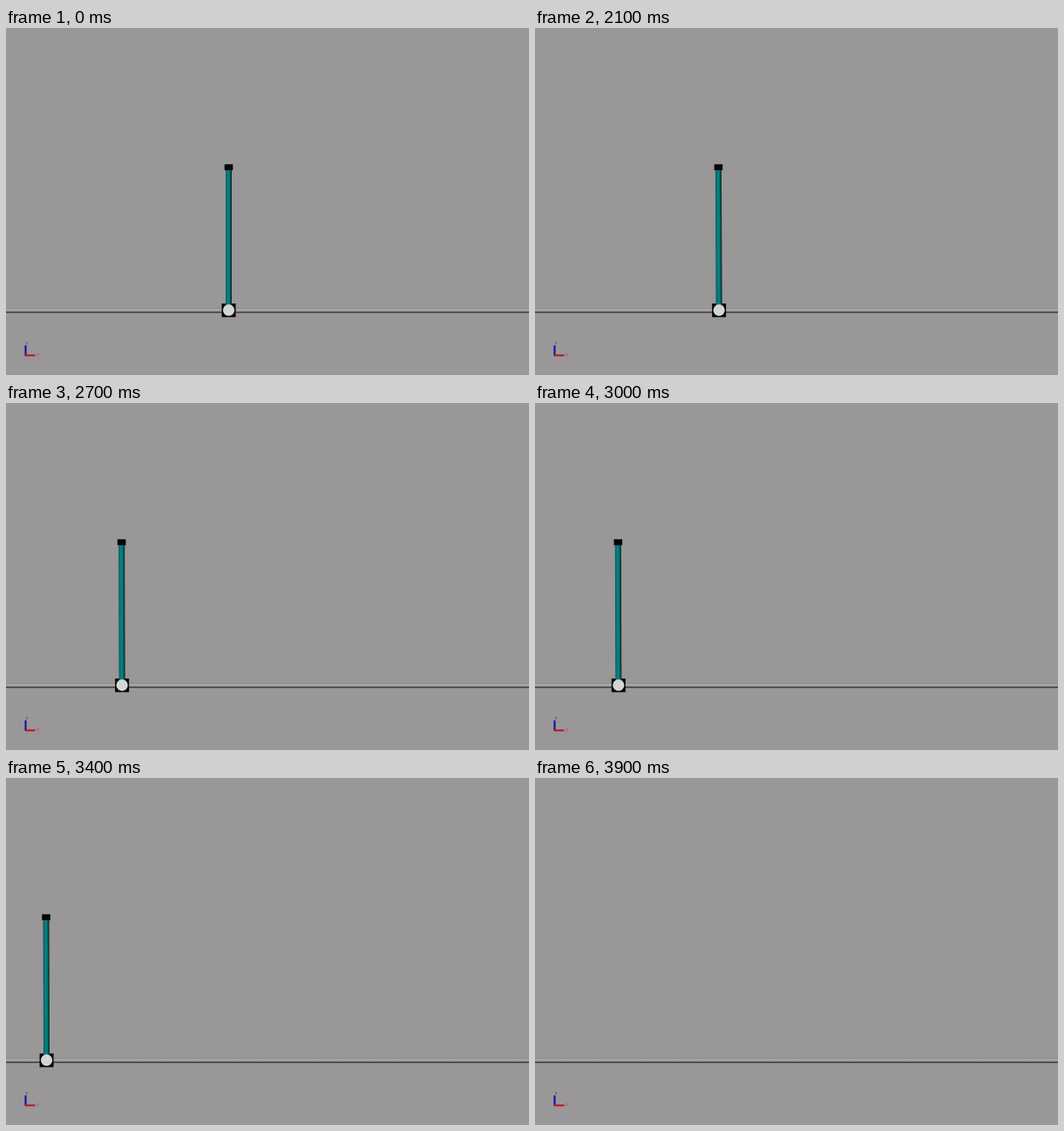
Write an HTML page that moves like this. It is 600 px wide and 398 px high and loops after 5000 ms.

```html
<!DOCTYPE html>
<html lang="en">
<head>
<meta charset="utf-8">
<title>Cart and pole</title>
<style>
  html, body { margin: 0; width: 100%; height: 100%; overflow: hidden; background: #999798; }
  svg { display: block; width: 100vw; height: 100vh; }
  text { font-family: "Liberation Sans", Arial, sans-serif; font-size: 6px; }
</style>
</head>
<body>
<svg viewBox="0 0 600 398">
  <defs>
    <linearGradient id="rail" x1="0" y1="0" x2="0" y2="1">
      <stop offset="0" stop-color="#848283"/>
      <stop offset=".2" stop-color="#9c9a9b"/>
      <stop offset=".42" stop-color="#b0aeaf"/>
      <stop offset=".62" stop-color="#8a8889"/>
      <stop offset=".85" stop-color="#4c4a4b"/>
      <stop offset="1" stop-color="#413f40"/>
    </linearGradient>
    <linearGradient id="teal" x1="0" y1="0" x2="1" y2="0">
      <stop offset="0" stop-color="#084e4e"/>
      <stop offset=".2" stop-color="#067575"/>
      <stop offset=".45" stop-color="#058484"/>
      <stop offset=".68" stop-color="#067070"/>
      <stop offset=".86" stop-color="#0a3c3c"/>
      <stop offset="1" stop-color="#082626"/>
    </linearGradient>
  </defs>
  <rect width="600" height="398" fill="#999798"/>
  <rect y="321" width="600" height="6" fill="url(#rail)"/>

  <path d="M22.5 364V376" stroke="#0a0aa8" stroke-width="2"/>
  <path d="M22 375.5H33.5" stroke="#b81414" stroke-width="2"/>
  <text x="22.5" y="363" fill="#4646a0">z</text>
  <text x="35" y="375.5" fill="#b84a4a">x</text>

  <g id="cart">
    <rect x="-8" y="316" width="16" height="15.6" fill="#050505"/>
    <g id="pole">
      <rect x="-3.5" y="162" width="7" height="157" fill="url(#teal)"/>
    </g>
    <rect id="cap" x="-4.8" y="156.3" width="9.6" height="6.8" fill="#050505"/>
    <circle cy="323.7" r="6.6" fill="#d3d4d4"/>
  </g>
</svg>
<script>
  const LOOP = 5000, START = 1800, END = 3900, STEP = 100;
  const PIVOT = 323.7, CAP_Y = 159.7;
  const [cart, pole, cap] = ["cart", "pole", "cap"].map(id => document.getElementById(id));

  // The cart is kicked left, then its speed settles; the pole lean damps out.
  function pose(t) {
    if (t < START) return { x: 255.5, lean: 0 };
    const n = Math.floor((t - START) / STEP);
    return {
      x: 254.5 - 12.2 * n - 13 * (1 - Math.exp(-n / 4.1)),
      lean: -0.5 - 3 * Math.exp(-n / 1.2)
    };
  }

  function draw(t) {
    const { x, lean } = pose(t);
    const angle = Math.atan2(lean, PIVOT - CAP_Y) * 180 / Math.PI;
    cart.setAttribute("visibility", t < END ? "visible" : "hidden");
    cart.setAttribute("transform", `translate(${x.toFixed(2)} 0)`);
    pole.setAttribute("transform", `rotate(${angle.toFixed(3)} 0 ${PIVOT})`);
    cap.setAttribute("transform", `translate(${lean.toFixed(2)} 0)`);
  }

  const t0 = performance.now();
  function tick() {
    draw((performance.now() - t0) % LOOP);
    requestAnimationFrame(tick);
  }
  tick();
</script>
</body>
</html>
```
